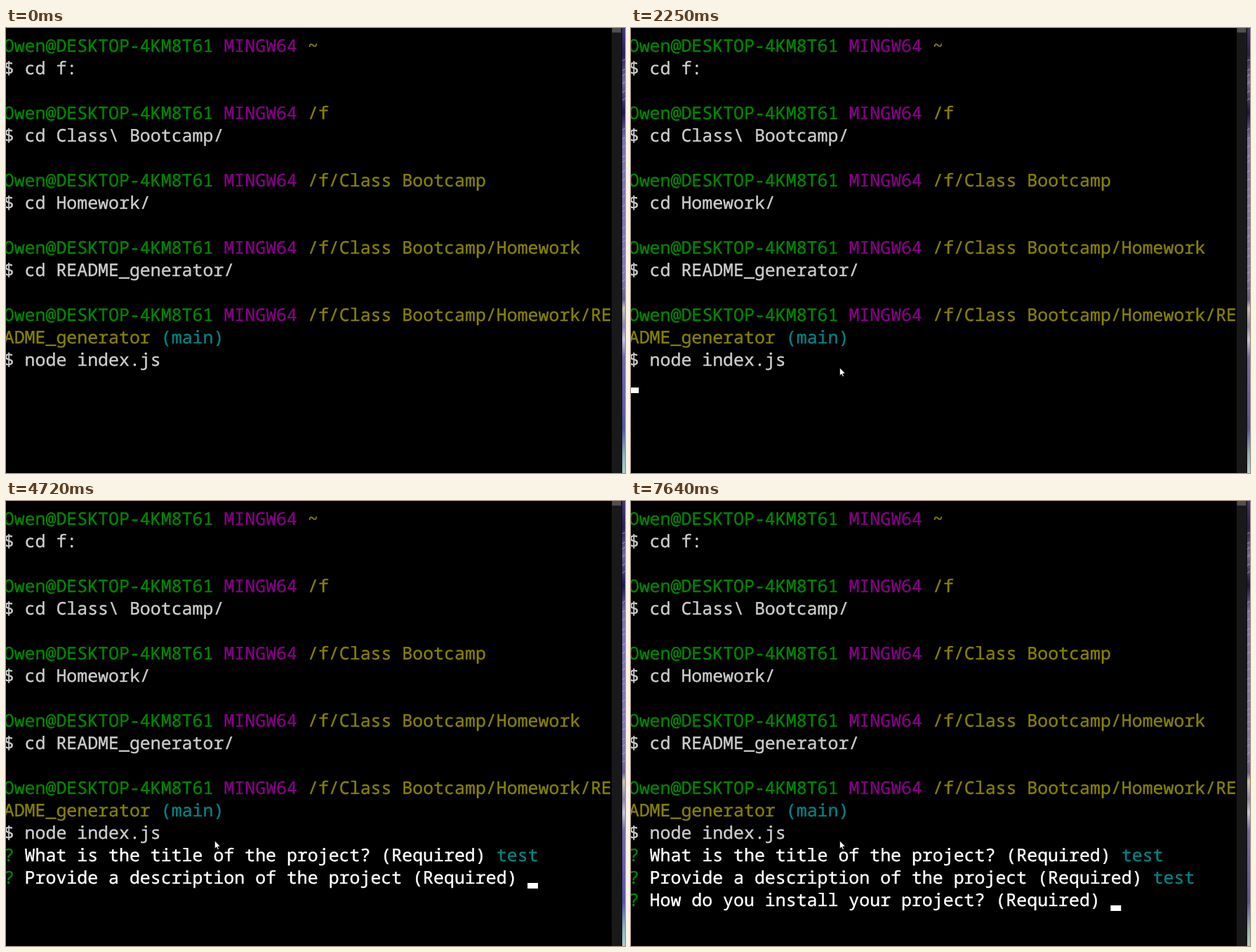
An HTML page for the animation above (8 s loop, 882 px wide and 635 px high).

```html
<!DOCTYPE html>
<html lang="en">
<head>
<meta charset="utf-8">
<title>README generator in a terminal</title>
<style>
  html, body { margin: 0; width: 100%; height: 100%; overflow: hidden; background: #000; }
  svg { display: block; width: 882px; height: 635px; }
  text {
    font: 24.9px "Noto Sans Mono", "DejaVu Sans Mono", monospace;
    white-space: pre;
    text-rendering: geometricPrecision;
    font-variant-ligatures: none;
    stroke-width: .4px;
  }
</style>
</head>
<body>
<svg viewBox="0 0 882 635">
  <defs>
    <linearGradient id="wall" x1="0" y1="0" x2="0" y2="1">
      <stop offset="0" stop-color="#43347c"/>
      <stop offset=".06" stop-color="#2a2058"/>
      <stop offset=".12" stop-color="#75689f"/>
      <stop offset=".19" stop-color="#1b174f"/>
      <stop offset=".25" stop-color="#7d71b0"/>
      <stop offset=".56" stop-color="#8278ae"/>
      <stop offset=".61" stop-color="#6a5f8c"/>
      <stop offset=".63" stop-color="#c9bfae"/>
      <stop offset=".67" stop-color="#8d84ad"/>
      <stop offset=".70" stop-color="#c6c2d8"/>
      <stop offset=".74" stop-color="#7469a8"/>
      <stop offset=".90" stop-color="#5755a4"/>
      <stop offset=".96" stop-color="#8fb3bd"/>
      <stop offset="1" stop-color="#a9d0ce"/>
    </linearGradient>
  </defs>
  <rect width="882" height="635"/>
  <g id="screen"></g>
  <rect id="caret" height="8" fill="#fff"/>
  <rect x="863" width="14.5" height="635" fill="#191919"/>
  <rect x="863.5" width="13" height="6.5" fill="#505050"/>
  <rect x="878" width="4" height="635" fill="url(#wall)"/>
  <g id="streaks" stroke="#b9add0" stroke-width="1.2" opacity=".6"></g>
  <path id="pointer" d="M0 0V11.4L2.6 9L4.3 12.8L6 12L4.4 8.3H8Z" fill="#fff" stroke="#000" stroke-width=".7"/>
</svg>
<script>
const LOOP = 8000, PITCH = 14.94, LEFT = -3.9, ROW = 32, BEARING = 0.6;
const GREEN = '#008600', PURPLE = '#860086', OLIVE = '#868200',
      TEAL = '#008484', GREY = '#cccccc', WHITE = '#fff';
const $ = id => document.getElementById(id);
const colX = col => LEFT + col * PITCH;

function add(parent, tag, attrs) {
  const el = document.createElementNS('http://www.w3.org/2000/svg', tag);
  for (const key in attrs) el.setAttribute(key, attrs[key]);
  return parent.appendChild(el);
}

function paint(el, color) {
  el.setAttribute('fill', color);
  el.setAttribute('stroke', color);
}

function put(row, col, string, color) {
  const el = add($('screen'), 'text', { x: colX(col) + BEARING, y: 34 + row * ROW });
  paint(el, color);
  el.textContent = string;
  return el;
}

function prompt(row, path, command) {
  put(row, 0, 'Owen@DESKTOP-4KM8T61', GREEN);
  put(row, 21, 'MINGW64', PURPLE);
  put(row, 29, path, OLIVE);
  if (command) put(row + 1, 0, '$ ' + command, GREY);
}

prompt(0, '~', 'cd f:');
prompt(3, '/f', 'cd Class\\ Bootcamp/');
prompt(6, '/f/Class Bootcamp', 'cd Homework/');
prompt(9, '/f/Class Bootcamp/Homework', 'cd README_generator/');
prompt(12, '/f/Class Bootcamp/Homework/RE');
put(13, 0, 'ADME_generator', OLIVE);
put(13, 15, '(main)', TEAL);
put(14, 0, '$ node index.js', GREY);

// shown: when the question appears; keys: typing times; done: when it is answered
const questions = [
  { text: 'What is the title of the project? (Required)', shown: 2920,
    keys: [4180, 4250, 4450, 4520], done: 4720 },
  { text: 'Provide a description of the project (Required)', shown: 4720,
    keys: [6510, 6640, 6780, 6850], done: 6980 },
  { text: 'How do you install your project? (Required)', shown: 6980, keys: [], done: LOOP }
];
questions.forEach((q, i) => {
  q.row = 15 + i;
  q.col = q.text.length + 3;
  q.parts = [put(q.row, 0, '?', GREEN), put(q.row, 2, q.text, WHITE)];
  q.answer = put(q.row, q.col, '', GREY);
});

// Spans in which the caret is lit
const lit = [[1320, 1850], [2250, 3450], [3980, 5050], [5580, 6040], [6510, 7110], [7640, LOOP]];

// Pointer: time, x, y
const trail = [
  [260, 846, 350], [330, 770, 372], [390, 680, 398], [460, 580, 424], [530, 480, 448],
  [590, 390, 467], [660, 322, 480], [730, 281, 487], [790, 288, 486], [920, 297.8, 485.2],
  [1120, 297.4, 484.8]
];

let seed = 7;
const random = () => (seed = seed * 16807 % 2147483647) / 2147483647;
for (let y = 45; y < 380; y += 6 + random() * 9) {
  if (y > 105 && y < 140) continue;
  add($('streaks'), 'line', { x1: 878, x2: 882, y1: y + 1.5, y2: y - random() * 2 });
}

function draw(t) {
  let row = 14, col = 15;
  if (t >= 2250) { row = 15; col = 0; }
  for (const q of questions) {
    const visible = t >= q.shown;
    const typed = q.keys.filter(k => t >= k).length;
    for (const part of q.parts) part.style.display = visible ? '' : 'none';
    q.answer.textContent = 'test'.slice(0, typed);
    paint(q.answer, t >= q.done ? TEAL : GREY);
    if (visible) { row = q.row; col = q.col + typed; }
  }
  const caret = $('caret');
  caret.setAttribute('x', colX(col));
  caret.setAttribute('y', 33 + row * ROW);
  caret.setAttribute('width', PITCH);
  caret.style.display = lit.some(([a, b]) => t >= a && t < b) ? '' : 'none';

  const spot = trail.filter(p => t >= p[0]).pop();
  $('pointer').style.display = spot ? '' : 'none';
  if (spot) $('pointer').setAttribute('transform', `translate(${spot[1]} ${spot[2]})`);
}

const start = performance.now();
function tick() {
  draw((performance.now() - start) % LOOP);
  requestAnimationFrame(tick);
}
tick();
</script>
</body>
</html>
```
